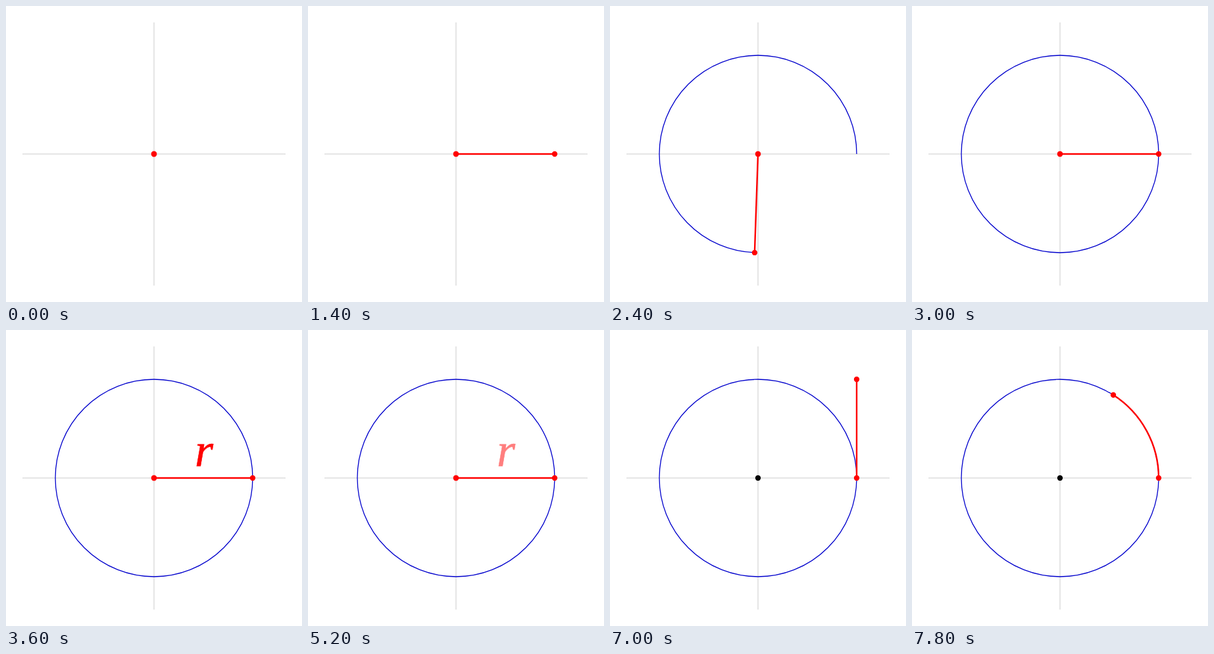
An HTML page that plays this animation: 450x450 px, repeating every 8 s.

```html
<!DOCTYPE html>
<html lang="en">
<head>
<meta charset="utf-8">
<title>Radius and radian</title>
<style>
  html, body { margin: 0; width: 100%; height: 100%; overflow: hidden; background: #fff; }
  svg { display: block; width: 100vw; height: 100vh; }
  path { fill: none; }
  text { font: italic 72px "Liberation Serif", "Times New Roman", serif; fill: #f00; stroke: #f00; stroke-width: .6; }
</style>
</head>
<body>
<svg viewBox="0 0 450 450">
  <path d="M25 225H425M225 25V425" stroke="#ccc"/>
  <path id="circle" d="M375 225A150 150 0 0 0 75 225A150 150 0 0 0 375 225" pathLength="360" stroke="#00c" stroke-width="1.3"/>
  <circle id="center" cx="225" cy="225" r="4.2"/>
  <path id="radius" stroke="#f00" stroke-width="2.4"/>
  <circle id="start" r="4.2" fill="#f00"/>
  <circle id="end" r="4.2" fill="#f00"/>
  <text id="label" x="287" y="207">r</text>
</svg>
<script>
const LOOP = 8000, STEP = 200, C = 225, R = 150;
const $ = id => document.getElementById(id);
const [circle, center, radius, start, end, label] =
  ['circle', 'center', 'radius', 'start', 'end', 'label'].map($);

const progress = (t, from, to) => Math.min(1, Math.max(0, (t - from) / (to - from)));
const ease = (t, from, to) => (1 - Math.cos(Math.PI * progress(t, from, to))) / 2;

function place(dot, [x, y]) {
  dot.setAttribute('cx', x);
  dot.setAttribute('cy', y);
}

// The radius sweeps around the center and draws the circle.
function sweep(t, angle) {
  const length = R * ease(t, 780, 1020);
  return [C + length * Math.cos(angle), C - length * Math.sin(angle)];
}

// The radius swings up to the tangent, then bends along the circle.
function wrap(t) {
  const swing = Math.PI / 2 * (1 - ease(t, 5750, 6025));
  const bend = ease(t, 7210, 7490);
  if (bend > 0) {
    return [C + R - R * (1 - Math.cos(bend)) / bend, C - R * Math.sin(bend) / bend, R / bend];
  }
  return [C + R - R * Math.sin(swing), C - R * Math.cos(swing), 0];
}

function draw(t) {
  const turn = ease(t, 2178, 2513);
  const detached = t > 5750;
  const from = detached ? [C + R, C] : [C, C];
  const [x, y, curve = 0] = detached ? wrap(t) : sweep(t, turn * 2 * Math.PI);
  const segment = curve ? `A${curve} ${curve} 0 0 0 ${x} ${y}` : `L${x} ${y}`;

  radius.setAttribute('d', `M${from}${segment}`);
  place(start, from);
  place(end, [x, y]);
  center.setAttribute('fill', detached ? '#000' : '#f00');
  circle.setAttribute('visibility', turn ? 'visible' : 'hidden');
  circle.setAttribute('stroke-dasharray', turn < 1 ? `${turn * 360} 400` : 'none');
  label.setAttribute('opacity', progress(t, 3300, 3500) - progress(t, 5100, 5300));
}

const origin = performance.now();
function tick() {
  const t = (performance.now() - origin) % LOOP;
  draw(Math.floor(t / STEP) * STEP);
  requestAnimationFrame(tick);
}
tick();
</script>
</body>
</html>
```
